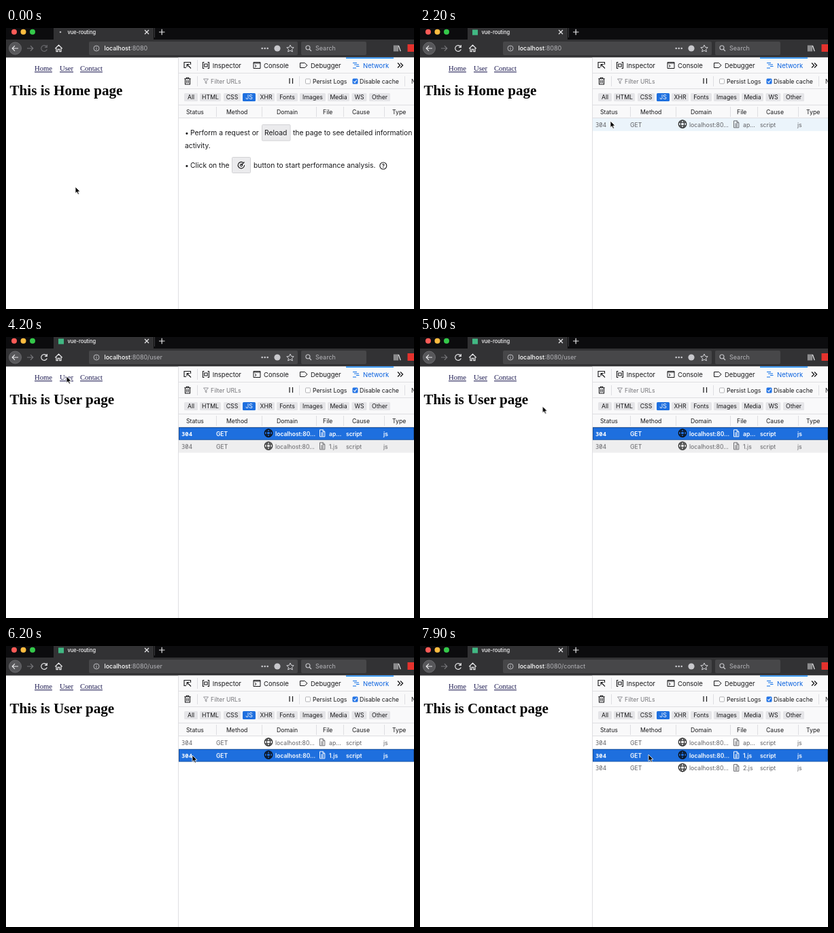
An HTML page for the animation above (8 s loop, 600 px wide and 414 px high).

```html
<!DOCTYPE html>
<html lang="en">
<head>
<meta charset="utf-8">
<title>vue-routing</title>
<style>
html, body { margin: 0; width: 100%; height: 100%; overflow: hidden; background: #fff; }
svg { display: block; width: 100%; height: 100%; }
text { font: 8.7px Inter, Roboto, sans-serif; fill: #18181a; white-space: pre; }
.tool text { font-size: 9.5px; }
.note text { font-size: 10.3px; }
.title { font-size: 7.4px; font-weight: 500; fill: #f9f9fa; }
.url text { font-size: 9px; fill: #b4b4b8; }
.url .host { font-size: 8.9px; font-weight: 500; fill: #fff; }
.page text { font: bold 21.1px "Liberation Serif", "Times New Roman", serif; fill: #000; }
.links text { font: 10.6px "Liberation Serif", "Times New Roman", serif; fill: #1b1950; text-decoration: underline; }
.row text { fill: #606064; }
.row .code { font-family: "Noto Sans Mono", monospace; font-size: 8.9px; }
.row .sel text { fill: #fff; font-weight: 600; font-size: 8.5px; }
.row .sel .code { font-weight: 700; font-size: 8.9px; }
.line { fill: none; stroke: #18181a; }
.light { fill: none; stroke: #e8e8ea; stroke-width: 1.2; }
.edge { stroke: #dfdfe2; }

.step { animation: 8s step-end infinite; }
.boot { animation-name: boot; }
.row1 { animation-name: row1; }
.row2 { animation-name: row2; }
.row3, .contact { animation-name: last; }
.home { animation-name: home; }
.user { animation-name: user; }
.hover1 { animation-name: hover1; }
.hover2 { animation-name: hover2; }
.sel1 { animation-name: sel1; }
.sel2 { animation-name: sel2; }
.never { opacity: 0; }
.busy { animation-name: busy; }
.swap { animation-name: swap; }
.ready { animation-name: ready; }
.icon { animation-name: icon; }
@keyframes boot { 0% { opacity: 1 } 6.25%, to { opacity: 0 } }
@keyframes row1 { 0% { opacity: 0 } 6.25%, to { opacity: 1 } }
@keyframes row2 { 0% { opacity: 0 } 52.5%, to { opacity: 1 } }
@keyframes last { 0% { opacity: 0 } 92.5%, to { opacity: 1 } }
@keyframes home { 0% { opacity: 1 } 51.25%, to { opacity: 0 } }
@keyframes user { 0% { opacity: 0 } 51.25% { opacity: 1 } 92.5%, to { opacity: 0 } }
@keyframes hover1 { 0% { opacity: 0 } 23.75% { opacity: 1 } 31.25%, to { opacity: 0 } }
@keyframes hover2 { 0% { opacity: 0 } 66.25% { opacity: 1 } 73.75%, to { opacity: 0 } }
@keyframes sel1 { 0% { opacity: 0 } 31.25% { opacity: 1 } 73.75%, to { opacity: 0 } }
@keyframes sel2 { 0% { opacity: 0 } 73.75%, to { opacity: 1 } }
@keyframes busy { 0% { opacity: 1 } 11.25%, to { opacity: 0 } }
@keyframes swap { 0% { opacity: 0 } 11.25% { opacity: 1 } 15%, to { opacity: 0 } }
@keyframes ready { 0% { opacity: 0 } 15%, to { opacity: 1 } }
@keyframes icon { 0% { opacity: 0 } 16.25%, to { opacity: 1 } }

.dot { animation: sway .4s ease-in-out infinite alternate; }
@keyframes sway { from { transform: translateX(0) } to { transform: translateX(-5px) } }
.burst { animation: burst 8s linear infinite; }
@keyframes burst {
  0%, 10% { r: 0px; opacity: .8 }
  12.5% { r: 99px; opacity: .65 }
  16.25% { r: 145px; opacity: 0 }
  to { r: 145px; opacity: 0 }
}
.cursor { animation: move 8s linear infinite; }
@keyframes move {
  0%, 2.5% { transform: translate(102px, 234px) }
  8.75%, 17.5% { transform: translate(102px, 250px) }
  23.75% { transform: translate(268px, 141px) }
  27.5% { transform: translate(280px, 137px) }
  31.25% { transform: translate(278px, 142px) }
  33.75% { transform: translate(262px, 186px) }
  35% { transform: translate(255px, 186px) }
  41.25% { transform: translate(120px, 139px) }
  46.25%, 55% { transform: translate(89px, 58px) }
  62.5% { transform: translate(180px, 102px) }
  67.5% { transform: translate(272px, 161px) }
  70%, 80% { transform: translate(274px, 161px) }
  88.75%, 92.5% { transform: translate(125px, 58px) }
  98.75%, to { transform: translate(336px, 160px) }
}
</style>
</head>
<body>
<svg viewBox="0 0 600 414">
  <defs>
    <clipPath id="tab"><path d="M70 0H217V17H70Z"/></clipPath>
    <path id="reload" d="M59.6 27.3A4.4 4.4 0 1 0 60.3 31.5M60.3 25V28.3H57" fill="none" stroke-width="1.2"/>
    <g id="globe" fill="none" stroke-width="1.3">
      <circle r="5.7"/><ellipse rx="2.6" ry="5.7"/><path d="M-5 -2.3H5M-5 2.3H5"/>
    </g>
    <path id="doc" d="M-3.5 -5H1.2L3.8 -2.4V5H-3.5ZM1 -5V-2.2H3.8M-1.8 -.6H2M-1.8 1.3H2M-1.8 3.2H2" fill="none"/>
  </defs>

  <rect width="600" height="414" fill="#fff"/>

  <!-- window bar -->
  <rect width="600" height="18" fill="#0c0c0e"/>
  <rect y="17" width="600" height="26.5" fill="#323234"/>
  <rect x="70" width="147" height="18" fill="#323234"/>
  <g clip-path="url(#tab)"><circle class="burst" cx="78" cy="8" r="0" fill="#1d3b5e"/></g>
  <circle cx="12" cy="5.8" r="4" fill="#fc5b57"/>
  <circle cx="25.5" cy="5.8" r="4" fill="#fdbc40"/>
  <circle cx="39" cy="5.8" r="4" fill="#34c84a"/>
  <g class="step busy"><circle class="dot" cx="80" cy="6" r="1.3" fill="#b4b4b8"/></g>
  <rect class="step icon" x="77" y="2.5" width="8" height="8" fill="#41b883"/>
  <text class="title" x="90.5" y="8.8">vue-routing</text>
  <path class="light" d="M204 3L210 9M210 3L204 9M225 6H233.5M229.2 1.8V10.2"/>
  <path d="M218.5 0V14" stroke="#3c3c40"/>

  <!-- navigation -->
  <circle cx="13.5" cy="30" r="9" fill="#57575a" stroke="#747478" stroke-width=".8"/>
  <path class="light" d="M18 30H9.5M13 26.2L9.2 30L13 33.8"/>
  <path d="M31 30H39.5M36 26.2L39.8 30L36 33.8" fill="none" stroke="#77777b" stroke-width="1.2"/>
  <use class="step busy" href="#reload" stroke="#68686c"/>
  <path class="step swap" d="M52 26L60 34" stroke="#8a8a8e" stroke-width="1.2"/>
  <use class="step ready" href="#reload" stroke="#e8e8ea"/>
  <path class="light" d="M72.2 30.4L77.5 25.2L82.8 30.4M74 29.5V34.6H76.2V31.3H78.8V34.6H81V29.5"/>
  <rect x="122" y="20" width="307" height="20" rx="2" fill="#474749"/>
  <rect x="434" y="20" width="96" height="20" rx="2" fill="#474749"/>
  <circle cx="133" cy="30" r="4" fill="none" stroke="#b8b8bc"/>
  <path d="M133 29.3V32.3M133 27.5V28.4" stroke="#b8b8bc"/>
  <g class="url">
    <text x="144.5" y="33.3"><tspan class="host">localhost</tspan>:8080</text>
    <text class="step user" x="208" y="33.3">/user</text>
    <text class="step contact" x="208" y="33.3">/contact</text>
    <text x="455" y="33.3">Search</text>
  </g>
  <g fill="#c8c8cc">
    <circle cx="376.7" cy="30" r="1.3"/><circle cx="380.7" cy="30" r="1.3"/><circle cx="384.7" cy="30" r="1.3"/>
    <circle cx="399" cy="30" r="4.6"/>
  </g>
  <path d="M418 25L419.6 28.4L423.2 28.8L420.5 31.3L421.3 35L418 33.1L414.7 35L415.5 31.3L412.8 28.8L416.4 28.4Z" fill="none" stroke="#d4d4d8"/>
  <circle cx="444" cy="29" r="3" fill="none" stroke="#c8c8cc" stroke-width="1.1"/>
  <path d="M446.2 31.2L449 34" stroke="#c8c8cc" stroke-width="1.3"/>
  <path class="light" d="M571 25.5V34.5M573.5 25.5V34.5M576 25.5V34.5M577.4 26L580.2 34.3"/>
  <rect x="590.5" y="24" width="9.5" height="11" fill="#e5322d"/>

  <!-- web page -->
  <g class="links"><text x="42" y="63.3">Home</text><text x="79" y="63.3">User</text><text x="109" y="63.3">Contact</text></g>
  <g class="page">
    <text class="step home" x="5.5" y="99">This is Home page</text>
    <text class="step user" x="5.5" y="99">This is User page</text>
    <text class="step contact" x="5.5" y="99">This is Contact page</text>
  </g>

  <!-- tool panel -->
  <rect x="254" y="43.5" width="346" height="89" fill="#f9f9fa"/>
  <path class="edge" d="M253.5 43.5V414M254 66.5H600M254 89.5H600M254 113.5H600M254 132.5H600M281.5 47V63M281.5 71V86M431.5 71V86M586.5 71V86" fill="none"/>
  <rect x="500" y="43.5" width="70" height="1.5" fill="#0a84ff"/>
  <path class="line" d="M265 58.5H262V50.5H271.5V54M266 53.5L272 59.5M266 53.5V57.5M266 53.5H270" stroke-width="1.1"/>
  <path class="line" d="M291.5 50.5H289.5V59.5H291.5M296.5 50.5H298.5V59.5H296.5M291.8 53H296.2V57H291.8Z" stroke-width="1.1"/>
  <path class="line" d="M364 50.5H374V59.5H364ZM364 52H374M366 54.2L368 56L366 57.8"/>
  <path class="line" d="M432.5 51.5H439.5L443 55L439.5 58.5H432.5Z"/>
  <path d="M510 51.5H516M512 54H519M515 56.5H519.5M510 59H515" stroke="#0a6fe8" stroke-width="1.2"/>
  <g class="tool">
    <text x="303.7" y="58.5">Inspector</text><text x="379" y="58.5">Console</text><text x="448" y="58.5">Debugger</text>
    <text x="525" y="58.5" style="fill:#0a62df">Network</text>
  </g>
  <path class="line" d="M576 51.5L579.5 55L576 58.5M580 51.5L583.5 55L580 58.5" stroke-width="1.3"/>

  <path class="line" d="M262.3 74.8H271.7M265.3 74.5V73.2H268.7V74.5M263.5 75V83H270.5V75M265.8 76.8V81.3M268.2 76.8V81.3" stroke-width="1.1"/>
  <path d="M290.5 75H297.5L294.8 78.2V82L293.2 81V78.2Z" fill="none" stroke="#8c8c90" stroke-width=".9"/>
  <text x="301" y="81.5" style="fill:#77777b">Filter URLs</text>
  <path class="line" d="M417 74V82M421.5 74V82" stroke-width="1.2"/>
  <rect x="440.5" y="75" width="7" height="7" rx="1.2" fill="#fff" stroke="#a0a0a4" stroke-width=".8"/>
  <rect x="509.5" y="74.5" width="8" height="8" rx="1.5" fill="#2374e6"/>
  <path d="M511.3 78.6L513 80.4L515.8 76.5" fill="none" stroke="#fff" stroke-width="1.1"/>
  <text x="451" y="81.5">Persist Logs</text><text x="520" y="81.5">Disable cache</text><text x="596" y="81.5">No throttling</text>
  <g id="filters"></g>

  <path class="edge" d="M309.5 116V131M376.5 116V131M456.5 116V131M496.5 116V131M556.5 116V131"/>
  <text x="265" y="127">Status</text><text x="324" y="127">Method</text><text x="398" y="127">Domain</text>
  <text x="466" y="127">File</text><text x="509" y="127">Cause</text><text x="568" y="127">Type</text>

  <g class="note step boot">
    <rect x="376.5" y="142.5" width="41.5" height="23.5" rx="1" fill="#ebebed" stroke="#d2d2d5"/>
    <rect x="332.5" y="190.5" width="27" height="23" rx="1" fill="#ebebed" stroke="#d2d2d5"/>
    <text x="263" y="158">•</text><text x="271" y="158">Perform a request or</text><text x="380" y="158">Reload</text>
    <text x="422" y="158">the page to see detailed information</text><text x="263" y="176.5">activity.</text>
    <text x="263" y="205.8">•</text><text x="271" y="205.8">Click on the</text><text x="364" y="205.8">button to start performance analysis.</text>
    <path class="line" d="M348.5 198.2A4.7 4.7 0 1 0 350.6 202M346 202L350.5 197.5" stroke-width="1.1"/>
    <circle class="line" cx="346" cy="202" r="1.7"/>
    <circle class="line" cx="554.8" cy="203" r="5" stroke-width="1.1"/>
    <text x="554.8" y="205.8" text-anchor="middle" style="font-size:7.5px;font-weight:700">?</text>
  </g>
  <g id="rows"></g>

  <path class="cursor" d="M0 0V9.6L2.2 7.6L3.8 11.2L5.5 10.4L3.9 7H7Z" fill="#000" stroke="#fff" stroke-width=".8"/>
</svg>
<script>
const find = id => document.getElementById(id);
const label = (x, y, str, cls = '') => `<text class="${cls}" x="${x}" y="${y}">${str}</text>`;

// name, left edge, width
const filters = [['All', 262, 20], ['HTML', 285, 31], ['CSS', 320, 25], ['JS', 348, 19], ['XHR', 370, 25],
  ['Fonts', 398, 31], ['Images', 432, 38], ['Media', 473, 32], ['WS', 508.5, 22], ['Other', 534, 31]];
find('filters').innerHTML = filters.map(([name, x, w]) => {
  const on = name === 'JS';
  return `<rect x="${x}" y="96" width="${w}" height="12" rx="1.5" fill="${on ? '#1f70df' : '#e5e5e8'}"/>
    <text x="${x + w / 2}" y="105.2" text-anchor="middle" ${on ? 'style="fill:#fff"' : ''}>${name}</text>`;
}).join('');

const cells = (file, globe, doc) => label(258, 12.7, '304', 'code') + label(309, 12.7, 'GET') +
  `<use href="#globe" x="386" y="8.5" stroke="${globe}"/>` + label(396, 12.7, 'localhost:80…') +
  `<use href="#doc" x="465" y="8.8" stroke="${doc}"/>` + label(475, 12.7, file) +
  label(500, 12.7, 'script') + label(555, 12.7, 'js');
const band = (color, cls = '') => `<rect class="${cls}" x="254" width="346" height="18.8" fill="${color}"/>`;
const focus = '<rect x="254.5" y=".5" width="345" height="17.8" fill="none" stroke="#174f9c"/>';

const row = (file, i) => {
  const n = i + 1, state = name => n < 3 ? `step ${name}${n}` : 'never';
  return `<g class="row step row${n}" transform="translate(0 ${133 + i * 18.8})">
    ${band(i % 2 ? '#eeeeef' : '#fff')}${band('#ebf4fb', state('hover'))}${cells(file, '#333', '#6a6a6e')}
    <g class="sel ${state('sel')}">${band('#1e6fde')}${focus}${cells(file, '#0c0c0d', '#fff')}</g></g>`;
};
find('rows').innerHTML = ['ap…', '1.js', '2.js'].map(row).join('');
</script>
</body>
</html>
```
